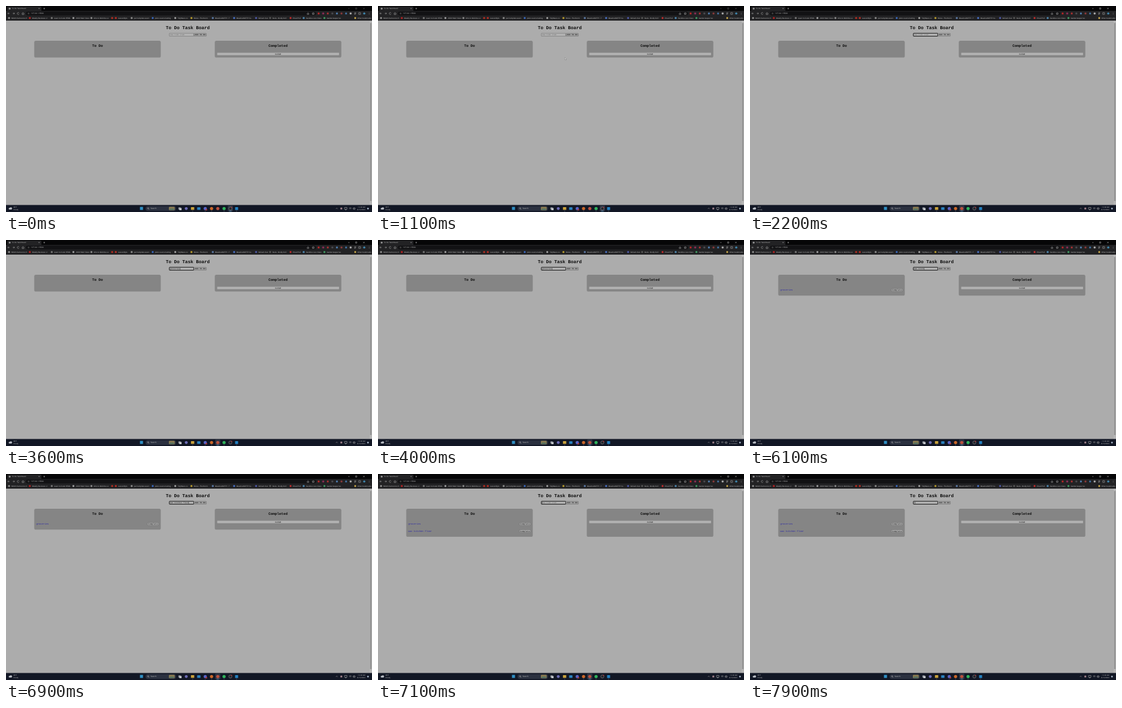
Recreate the animation shown at these times as an HTML page. Size 600 px wide and 338 px high, loop 8000 ms.

```html
<!DOCTYPE html>
<html lang="en">
<head>
<meta charset="utf-8">
<title>To Do Task Board</title>
<style>
  html, body { margin: 0; width: 100%; height: 100%; overflow: hidden; background: #acacac; }
  svg { display: block; width: 600px; height: 338px; }
  text { white-space: pre; text-rendering: geometricPrecision; }
  .ui { font-family: Roboto, "Noto Sans", sans-serif; font-size: 3.1px; fill: #b4b4b4; }
  .mono { font-family: "Liberation Mono", "Courier New", monospace; fill: #0c0c0c; }
  .mid { text-anchor: middle; }
  .bold { font-weight: bold; }
  .line { fill: none; stroke: #aaa; stroke-width: .6; }
</style>
</head>
<body>
<svg id="stage" viewBox="0 0 600 338" xmlns="http://www.w3.org/2000/svg"></svg>
<script>
const NS = 'http://www.w3.org/2000/svg';
const stage = document.getElementById('stage');

function add(tag, attrs, parent = stage) {
  const el = document.createElementNS(NS, tag);
  for (const k in attrs) el.setAttribute(k, attrs[k]);
  parent.appendChild(el);
  return el;
}
const rect = (x, y, width, height, fill, more, parent) =>
  add('rect', { x, y, width, height, fill, ...more }, parent);
const dot = (cx, cy, r, fill, more) => add('circle', { cx, cy, r, fill, ...more });
const line = (d, more) => add('path', { d, class: 'line', ...more });
function label(x, y, str, cls, size, parent) {
  const el = add('text', { x, y, class: cls }, parent);
  if (size) el.style.fontSize = size + 'px';
  el.textContent = str;
  return el;
}
const show = (el, on) => el.setAttribute('visibility', on ? 'visible' : 'hidden');

/* Browser frame */
rect(0, 0, 600, 9, '#060607');
rect(2, 1, 56, 9, '#222224', { rx: 1.5 });
rect(0, 8, 600, 16.2, '#222224');
dot(6, 4.2, 1.5, '#9a9a9a');
label(10, 5.3, 'To Do Task Board', 'ui', 2.9);
line('M53.5 3.4l1.6 1.6m0-1.6l-1.6 1.6M61.4 4.2h2.6m-1.3-1.3v2.6', { 'stroke-width': .4 });
const controls = line('M561 4.2h2.2M573 3.1h2.1v2.1h-2.1zM585.6 3.1l2.2 2.2m0-2.2l-2.2 2.2', { 'stroke-width': .45 });
line('M6 12.2H3m1.3-1.4L3 12.2l1.3 1.4M11 12.2h3m-1.3-1.4l1.3 1.4-1.3 1.4M21.4 11.4a1.6 1.6 0 1 0 .1 1.6M26 12.4l1.9-1.7 1.9 1.7M26.6 12v2h2.6v-2');
rect(32.5, 9.2, 476, 6.2, '#121214', { rx: 3.1 });
dot(37, 12.3, 1, 'none', { stroke: '#999', 'stroke-width': .4 });
label(41, 13.4, '127.0.0.1:5500', 'ui');
line('M493.8 12v1.8h2.6V12m-1.3 1v-2.6M503.7 10.6l.6 1.2 1.3.1-1 .9.3 1.3-1.2-.7-1.2.7.3-1.3-1-.9 1.3-.1z', { 'stroke-width': .4 });
[[512.5, '#b32626'], [520, '#8d2d58'], [527.5, '#a33030'], [535, '#4b4b4f'], [542.5, '#4b78a8'],
 [550, '#8a3a3a'], [557.5, '#3f6d9c'], [565, '#b0b0b0']]
  .forEach(([x, c]) => rect(x - 1.5, 10.8, 3, 3, c, { rx: .7 }));
line('M571 11h3m-3 1.3h3m-3 1.3h2M578.2 10.8h3v3h-3z', { 'stroke-width': .45 });
dot(587.3, 12.3, 1.8, '#3e83a8');
[10.9, 12.3, 13.7].forEach(y => dot(595.2, y, .35, '#b5b5b5'));

const marks = [
  [5, '#8e8e8e', 'NOVA Harmonics/C'], [39, '#b52222', 'Weekly Business: 2'], [75, '#777', 'Learn to Code HTML'],
  [110.5, '#999', 'JSON Web Token'], [140, '#8a8a8a', 'Intro to Web Dev w'], [174, '#b32d20', ''],
  [180, '#b82c24', 'LessonByte'], [206, '#8a8a8a', 'just template exam'], [240.5, '#3764b5', 'pluto source testing'],
  [277.5, '#9a9a9a', 'TidyNews.co'], [304, '#b79b2e', 'Notes - The Norm'], [339, '#5b79a6', 'MeadowNOTE? - T'],
  [374, '#476fc4', 'MeadowNOTE? Cu'], [410, '#4d58a8', 'Default chat'], [433, '#555', 'Dude - Kindly Doll'],
  [466.5, '#b72c2c', 'Email Poll'], [488, '#4d88b0', 'Sandbox Live Class'], [522, '#3f9a62', 'Garden keeper les'],
  [572.5, '#b99b45', 'Other bookmarks']
];
for (const [x, c, name] of marks) {
  rect(x - 1.5, 18.2, 3, 3, c, { rx: .8 });
  label(x + 3.7, 20.8, name, 'ui', 2.95);
}

/* Page */
rect(0, 24, 600, 303, '#acacac');
rect(596, 24, 4, 302.5, '#b5b5b5');
rect(596.8, 28, 2.4, 292, '#929292');
label(298, 37.6, 'To Do Task Board', 'mono bold mid', 7.5);

const CHAR = 1.8, FIELD_X = 268.9;
const field = rect(267.8, 44.8, 40, 4.7, '#b3b3b3', { rx: .4 });
const typed = label(FIELD_X, 48.1, '', 'mono', CHAR / .6);
const caret = rect(0, 45.7, .4, 3, '#111');
rect(308.2, 44.9, 20.2, 4.5, '#a2a2a2', { stroke: '#5c5c5c', 'stroke-width': .5, rx: .4 });
label(318.2, 48.1, 'ADD TO DO', 'mono mid', 3.2);

const cards = [46.3, 342.3].map(x => rect(x, 57, 207.4, 27.5, '#858585', { rx: 2.6 }));
label(150, 66.6, 'To Do', 'mono bold mid', 5.9);
label(446, 66.6, 'Completed', 'mono bold mid', 5.85);
rect(346.2, 76.7, 199.8, 4, '#b2b2b2', { stroke: '#9a9a9a', 'stroke-width': .3, rx: .4 });
label(446, 79.9, 'CLEAR', 'mono mid', 3.2);

const tasks = ['groceries', 'wax kitchen floor'];
const rows = tasks.map((name, i) => {
  const g = add('g', {}), y = 82 + 11.6 * i;
  label(49.5, y + 1.1, name, 'mono', 3.8, g).style.fill = '#2e2aa5';
  rect(232, y - 2.1, 18, 4.2, '#b0b0b0', { stroke: '#5e5e5e', 'stroke-width': .4, rx: .4 }, g);
  label(241, y + 1, 'Complete', 'mono mid', 3.3, g);
  return g;
});

/* Taskbar */
rect(0, 326.5, 600, 11.5, '#121725');
dot(6, 332.6, 1.5, '#b8bcc4');
dot(8, 332.2, 1.9, '#b8bcc4');
label(12, 331.3, '49°F', 'ui', 2.9);
label(12, 335.2, 'Cloudy', 'ui', 2.7);
rect(219.6, 329.6, 5, 5, '#2f8fc4');
rect(228.8, 328.4, 50, 7.8, '#2b3140', { rx: 3.9 });
dot(233, 332, 1.1, 'none', { stroke: '#bbb', 'stroke-width': .5 });
line('M233.8 332.8l1 1', { 'stroke-width': .5 });
label(237, 333.4, 'Search', 'ui');
rect(267, 329.4, 9.6, 5.8, '#8a7a50', { rx: 1.4 });
rect(268, 332.4, 7.6, 2.4, '#4d6f62', { rx: 1 });
const glow = rect(0, 327.6, 8.6, 9.2, '#2d3444', { rx: 1.2 });
const bar = rect(0, 336.2, 4.4, .7, '#5f9ec9', { rx: .3 });
rect(282.6, 330.4, 3.6, 3.6, '#8a8f98');
rect(284.2, 331.4, 3.6, 3.6, '#c4c7cc');
dot(295.5, 332.3, 2.4, '#6c6cb5');
rect(303.2, 330, 5.4, 4.6, '#c9a23c', { rx: .6 });
rect(313.4, 330.2, 5.4, 4.4, '#2b84c2', { rx: .6 });
dot(326.6, 332.3, 2.6, '#5863c4');
dot(328.5, 334.2, 1.2, '#c23a3a');
dot(337, 332.3, 2.6, '#c9672a');
dot(347.2, 332.3, 2.6, '#b8503e');
dot(357.5, 332.3, 2.6, '#2fb05a');
dot(367.8, 332.3, 2.6, '#24252b', { stroke: '#8b8d93', 'stroke-width': .6 });
dot(369.8, 330.4, .9, '#b83434');
rect(375.6, 329.9, 4.9, 4.9, '#2380c0', { rx: .6 });
[306, 326.6, 337, 357.5, 378].forEach(x => rect(x - .9, 336.3, 1.8, .5, '#7b828f'));
line('M540.8 332.9l1.4-1.4 1.4 1.4M555 330.5h4v3h-4zM556 334.6h2M562.4 331.8q2-1.8 4 0M563.3 333q1.1-1 2.2 0M569 331.6h1l1.1-1v3.6l-1.1-1h-1zM572 331.2q.9 1.2 0 2.4', { 'stroke-width': .5 });
rect(548.2, 330.8, 3, 3, '#9c7f88', { rx: .6 });
for (const [y, s] of [[331.3, '12:40 AM'], [335.2, '8/13/2023']])
  label(589, y, s, 'ui', 2.8).setAttribute('text-anchor', 'end');
dot(593.4, 332.4, 1.4, '#a9b7c8');

const arrow = add('path', {
  d: 'M0 0v3.6l.9-.8.6 1.3.6-.3-.6-1.2h1.1z', fill: '#f0f0f0', stroke: '#222', 'stroke-width': .25
});
const beam = add('path', { d: 'M-.6-1.6h1.2m-.6 0v3.2m-.6 0h1.2', fill: 'none', stroke: '#333', 'stroke-width': .25 });

/* Timeline, ms */
const LOOP = 8000, CLICK = 1700, BLINK = 450;
const enters = [4100, 7050];
const steady = (from, n) => Array.from({ length: n }, (_, i) => from + 100 * i);
const phases = [
  { from: CLICK, text: tasks[0], keys: [...steady(2600, 4), ...steady(3100, 4), 3600] },
  { from: enters[0], text: tasks[1], keys: [4900, 5100, 5100, 5300, 5400, 5600, 5800, ...steady(6000, 10)] },
  { from: enters[1], text: 'r', keys: [7900] }
];
const path = [[100, 368, 333], [900, 308, 102], [1100, 306.4, 84.6], [1300, 291, 47]];

function pointer(t) {
  let i = 0;
  while (i < path.length - 2 && t > path[i + 1][0]) i++;
  const [a, ax, ay] = path[i], [b, bx, by] = path[i + 1];
  const p = Math.min(1, Math.max(0, (t - a) / (b - a)));
  return [ax + (bx - ax) * p, ay + (by - ay) * p];
}

function draw(time) {
  const t = Math.floor(time % LOOP / 100) * 100;
  const focused = t >= CLICK;
  const phase = phases.filter(p => t >= p.from).pop();
  const hits = phase ? phase.keys.filter(k => k <= t) : [];
  const n = hits.length;

  typed.textContent = n ? phase.text.slice(0, n) : 'new todo item';
  typed.style.fill = n ? '#111' : '#666';
  field.setAttribute('stroke', focused ? '#080808' : '#636363');
  field.setAttribute('stroke-width', focused ? .9 : .5);
  const last = n ? hits[n - 1] : phase ? phase.from : 0;
  caret.setAttribute('x', FIELD_X + n * CHAR);
  show(caret, focused && Math.floor((t - last) / BLINK) % 2 === 0);

  const count = enters.filter(e => t >= e).length;
  rows.forEach((g, i) => show(g, i < count));
  cards.forEach(c => c.setAttribute('height', [27.5, 34.3, 46][count]));

  const app = focused ? 347.2 : 367.8;
  glow.setAttribute('x', app - 4.3);
  bar.setAttribute('x', app - 2.2);
  controls.setAttribute('opacity', focused ? 1 : .45);

  const [x, y] = pointer(t);
  const inField = y < 50;
  for (const el of [arrow, beam]) el.setAttribute('transform', `translate(${x} ${y})`);
  show(arrow, t >= 100 && !inField);
  show(beam, inField && t < 2000);
}

const start = performance.now();
function tick() {
  draw(performance.now() - start);
  requestAnimationFrame(tick);
}
tick();
</script>
</body>
</html>
```
